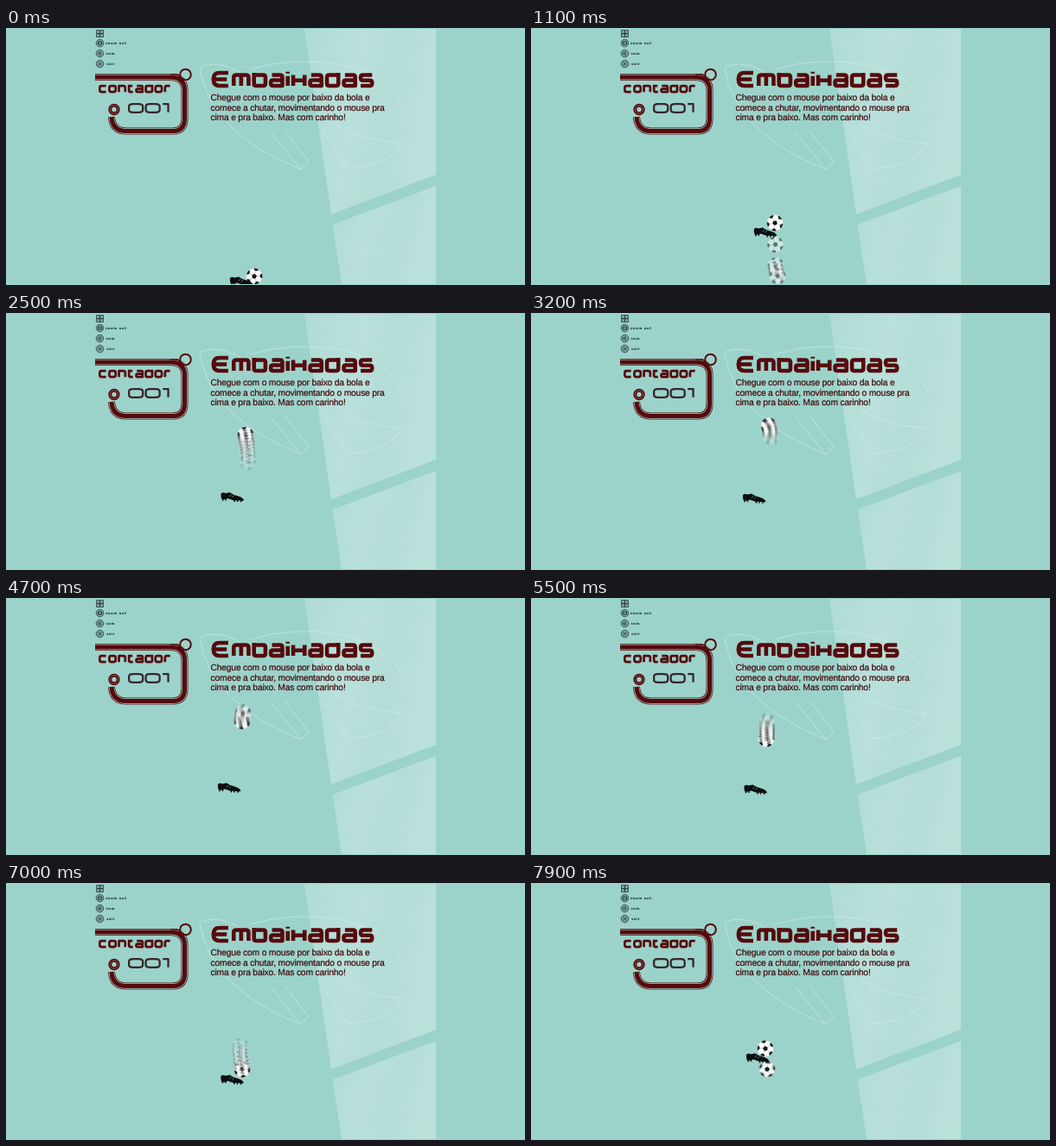
An HTML page that plays this animation: 600 by 298 pixels, repeating every 8000 ms.

```html
<!DOCTYPE html>
<html lang="pt">
<head>
<meta charset="utf-8">
<title>Embaixadas</title>
<style>
html, body { margin: 0; width: 100%; height: 100%; overflow: hidden; background: #9bd3ca; }
svg { display: block; width: 600px; height: 298px; }
.copy {
  font: 10.3px "Liberation Sans", Arial, sans-serif;
  letter-spacing: -.19px;
  text-rendering: geometricPrecision;
  fill: #42090d;
  stroke: #42090d;
  stroke-width: .2;
}
.menu { font: bold 4px "DejaVu Sans", sans-serif; letter-spacing: .45px; fill: #1f3537; }
.lettering { fill: none; stroke-linejoin: round; }
.lettering path { vector-effect: non-scaling-stroke; }
.leaf { fill: none; stroke: #d3ece7; stroke-width: .8; opacity: .75; }
.track { fill: none; stroke: #560a0d; }
.icon { fill: #789f9b; stroke: #35504f; stroke-width: .9; }
.mark { fill: none; stroke: #263b3c; stroke-width: 1; }
</style>
</head>
<body>
<svg viewBox="0 0 600 298">
  <defs>
    <linearGradient id="glass" x1="0" y1="0" x2="1" y2=".25">
      <stop offset="0" stop-color="#afdcd4"/>
      <stop offset=".45" stop-color="#b9e0da"/>
      <stop offset=".7" stop-color="#b3ddd6"/>
      <stop offset="1" stop-color="#bbe1db"/>
    </linearGradient>
    <clipPath id="round"><circle r="9.500"/></clipPath>
    <clipPath id="stage"><path d="M103 1H497V297H103Z"/></clipPath>
    <path id="rail" d="M103 57H190Q206.500 57 206.500 72V105Q206.500 119.500 193 119.500H139Q123 119.500 122 103"/>
    <g id="ball">
      <circle r="9.500" fill="#fafcfb"/>
      <g id="patches" clip-path="url(#round)"></g>
      <circle r="9.300" fill="none" stroke="#9fb3b0" stroke-width=".4"/>
    </g>
  </defs>

  <path fill="url(#glass)" d="M345 1H497V170L376 216Z"/>
  <path fill="url(#glass)" d="M377.500 228L497 183V297H388Z"/>

  <g class="leaf">
    <path d="M306 121L341 164L350 155L322 119M341 164Q236 122 224 47Q225 43 240 42Q268 42 290 70"/>
    <path d="M366 119L395 163Q443 160 458 134Q410 130 380 112"/>
    <path d="M282 48Q330 33 385 42Q440 55 459 91"/>
  </g>

  <g class="icon">
    <path d="M104.500 2.500H112.500V10.500H104.500Z"/>
    <circle cx="108.500" cy="17.500" r="4.300"/>
    <circle cx="108.500" cy="29.500" r="4.300"/>
    <circle cx="108.500" cy="41.500" r="4.300"/>
  </g>
  <path class="mark" d="M105 6.500H112M108.500 3V10M106.500 16H110.500V19H106.500ZM107 28V31M109 27V32M106.700 39.700L110.300 43.300M110.300 39.700L106.700 43.300"/>
  <g class="menu">
    <text x="115" y="18.600">zoom out</text>
    <text x="115.500" y="30.600">som</text>
    <text x="116" y="42.600">sair</text>
  </g>

  <g class="track">
    <use href="#rail" stroke-width="8"/>
    <use href="#rail" stroke="#9bd3ca" stroke-width="6.400"/>
    <use href="#rail" stroke-width="5"/>
    <path d="M190 53.800H197Q200 54 202 58" stroke-width="1.500"/>
    <circle cx="207.500" cy="54" r="6.300" stroke-width="2"/>
    <circle cx="125" cy="94.500" r="4.700" stroke-width="4"/>
    <circle cx="125" cy="94.500" r="4.700" stroke="#9a8583" stroke-width=".6"/>
  </g>

  <g id="letters"></g>
  <g class="copy">
    <text x="236.500" y="84">Chegue com o mouse por baixo da bola e</text>
    <text x="236.500" y="95.500">comece a chutar, movimentando o mouse pra</text>
    <text x="236.500" y="107">cima e pra baixo. Mas com carinho!</text>
  </g>

  <g clip-path="url(#stage)">
    <use id="live" href="#ball"/>
    <g id="trail"></g>
    <g id="shoe">
      <path fill="#0b0e0f" d="M-13 -4Q-11 -6 -8 -4.500L-3 -5.500Q1 -2.500 6 -1.500Q12 0 13.500 3.500L12 4.500Q6 3.500 2 4L-5 1.500Q-8 3 -12 2.500Q-13.500 0 -13 -4Z"/>
      <path stroke="#0b0e0f" stroke-width="1.500" d="M-11 2V4.300M-7.500 2V4M2.500 3.500V5.600M6 3.500V5.600M10 4V5.800"/>
      <path fill="none" stroke="#9bb5b1" stroke-width=".6" d="M-1 -3L-3 -.5M2 -2L0 .5"/>
    </g>
  </g>
</svg>

<script>
const $ = id => document.getElementById(id);

function add(parent, tag, attrs) {
  const el = document.createElementNS("http://www.w3.org/2000/svg", tag);
  for (const k in attrs) el.setAttribute(k, attrs[k]);
  return parent.appendChild(el);
}

// Display letters, drawn as strokes in a box of 10 by 10 with short ascenders above it
const glyphs = {
  E: "M10 -2H4Q0 -2 0 4T4 10H10M0 4H9",
  m: "M0 10V2Q0 0 2 0H8Q10 0 10 2V10M5 0V10",
  b: "M0 -2V8Q0 10 2 10H8Q10 10 10 8V2Q10 0 8 0H0",
  a: "M1 0H8Q10 0 10 2V10H2Q0 10 0 8V6.500Q0 4.800 2 4.800H10",
  i: "M0 1V10M0 -3V-1.500",
  x: "M0 0V10M10 0V10M0 5H10",
  d: "M10 -2V8Q10 10 8 10H2Q0 10 0 8V2Q0 0 2 0H10",
  s: "M10 0H2Q0 0 0 2.500T2 5H8Q10 5 10 7.500T8 10H0",
  c: "M10 0H3Q0 0 0 3V7Q0 10 3 10H10",
  o: "M3 0H7Q10 0 10 3V7Q10 10 7 10H3Q0 10 0 7V3Q0 0 3 0Z",
  n: "M0 10V0H7Q10 0 10 3V10",
  t: "M1 -2V7Q1 10 4 10H10M1 0H9",
  r: "M0 10V3Q0 0 3 0H10",
  1: "M0 0H10V10"
};
glyphs[0] = glyphs.o;
const widths = { E: 1.3, m: 1.3, i: 0, t: 0.7, r: 0.8, 1: 0.4 };

function lettering(text, x, top, w, h, line, gap, stroke) {
  const g = add($("letters"), "g", { class: "lettering", role: "img", "aria-label": text, "stroke-width": line, stroke });
  for (const ch of text) {
    const cw = w * (widths[ch] ?? 1);
    add(g, "path", {
      d: glyphs[ch],
      transform: `translate(${x + line / 2} ${top}) scale(${cw / 10 || 1} ${h / 10})`
    });
    x += cw + line + gap;
  }
}
lettering("Embaixadas", 237.5, 54.5, 13.2, 12.5, 4.6, 1.7, "#560a0d");
lettering("contador", 107, 67.2, 7.3, 7, 2.7, 1.1, "#560a0d");
lettering("001", 141, 88.2, 16, 9.6, 2.3, 1.2, "#38262b");

// Ball patches: one pentagon in the middle, five at the rim
function pentagon(cx, cy, r, turn) {
  const pts = [...Array(5)].map((_, i) => {
    const a = turn + i * Math.PI * 0.4;
    return [cx + r * Math.cos(a), cy + r * Math.sin(a)].map(v => v.toFixed(2));
  });
  add($("patches"), "polygon", { points: pts.join(" "), fill: "#101415" });
}
pentagon(0, 0, 3, -Math.PI / 2);
for (let i = 0; i < 5; i++) {
  const a = -Math.PI / 2 + i * Math.PI * 0.4;
  const c = Math.cos(a), s = Math.sin(a);
  pentagon(9 * c, 9 * s, 2.9, a + Math.PI);
  add($("patches"), "line", { x1: 3 * c, y1: 3 * s, x2: 7 * c, y2: 7 * s, stroke: "#b4bfbd", "stroke-width": 0.6 });
}

const STEP = 100, LOOP = 8000, GHOSTS = 8;

// Points are [step, value]; straight runs between them
function along(points, n) {
  const i = points.findIndex(p => p[0] >= n);
  if (i < 0) return points[points.length - 1][1];
  if (i === 0) return points[0][1];
  const [a, va] = points[i - 1], [b, vb] = points[i];
  return va + (vb - va) * (n - a) / (b - a);
}

const ballX = [[0, 287], [7, 284], [11, 282], [18, 279], [32, 275], [47, 273], [63, 271], [67, 273], [78, 273], [79, 271]];
const launch = [[0, 288], [5, 288], [7, 284], [9, 275], [10, 251], [11, 226], [12, 205], [18, 166]];
const shoeX = [[0, 272], [18, 270], [28, 258], [47, 258], [63, 261], [79, 262]];
const shoeY = [[0, 294], [7, 293], [9, 285], [10, 260], [11, 237], [12, 222], [18, 212], [32, 215], [47, 220], [63, 224], [67, 228], [77, 228], [78, 223], [79, 203]];

function ballY(n) {
  if (n <= 18) return along(launch, n);
  if (n <= 34) return 130 + 36 * ((34 - n) / 16) ** 2;
  if (n < 79) return Math.min(216, 130 + 0.0755 * (n - 34) ** 2);
  return 192;
}

function place(el, n) {
  el.setAttribute("transform", `translate(${along(ballX, n)} ${ballY(n)}) rotate(${15 - n * 4})`);
}

// Older ghosts lie over newer ones and whiten the ball
const ghosts = [];
for (let age = 1; age <= GHOSTS; age++) {
  ghosts.push({ age, el: add($("trail"), "use", { href: "#ball", opacity: 0.6 * 0.83 ** age }) });
}

function draw(ms) {
  const n = Math.floor(ms % LOOP / STEP);
  for (const { age, el } of ghosts) {
    el.setAttribute("visibility", n >= age ? "visible" : "hidden");
    place(el, Math.max(0, n - age));
  }
  place($("live"), n);
  $("shoe").setAttribute("transform", `translate(${along(shoeX, n)} ${along(shoeY, n)})`);
}

const start = performance.now();
function tick() {
  draw(performance.now() - start);
  requestAnimationFrame(tick);
}
tick();
</script>
</body>
</html>
```
